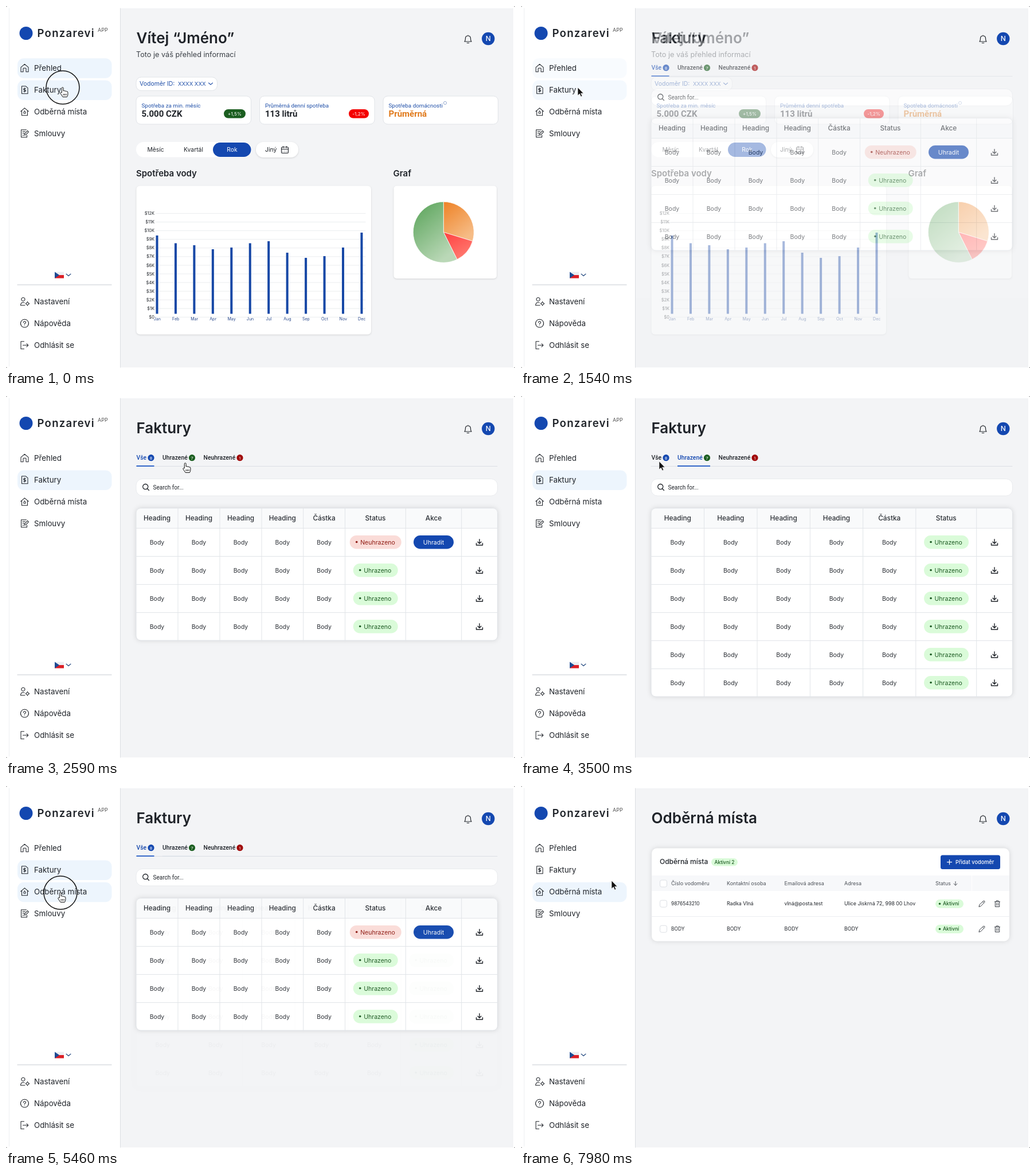
An HTML page for the animation above (8000 ms loop, 888 by 631 pixels).

```html
<!DOCTYPE html>
<html lang="cs">
<meta charset="utf-8">
<title>Přehled</title>
<style>
  html, body { margin: 0; width: 100%; height: 100%; overflow: hidden; background: #888 }
  svg { display: block; width: 888px; height: 631px }
  text { font-family: Inter, sans-serif; white-space: pre }
  .r { font-family: Roboto, sans-serif }
  .m { text-anchor: middle }
  .e { text-anchor: end }
  .s { font-weight: 500 }
  .b { font-weight: 600 }
  .card { filter: drop-shadow(0 1px 1.5px #0002) }
  .soft { filter: drop-shadow(0 0 4px #0002) }
</style>
<svg id="stage" viewBox="0 0 888 631"></svg>
<script>
const INK = '#1f2329', BLUE = '#1448b0', GREEN = '#1b5e20', RED = '#a00404', BG = '#f3f4f6', MINT = '#dafbd9', LINE = '#e1e4e8';

const text = (x, y, s, size, cls = '', fill = INK) =>
  `<text x="${x}" y="${y}" font-size="${size}" class="${cls}" fill="${fill}">${s}</text>`;
const rect = (x, y, w, h, rx, fill, more = '') =>
  `<rect x="${x}" y="${y}" width="${w}" height="${h}" rx="${rx}" fill="${fill}" ${more}/>`;
const circle = (x, y, r, fill, more = '') => `<circle cx="${x}" cy="${y}" r="${r}" fill="${fill}" ${more}/>`;
const line = (d, color = INK, width = 1.1, x = 0, y = 0) =>
  `<path d="${d}" transform="translate(${x} ${y})" fill="none" stroke="${color}" stroke-width="${width}" stroke-linecap="round" stroke-linejoin="round"/>`;
const group = (id, body) => `<g id="${id}">${body}</g>`;
const page = (id, body) => group(id, rect(200, 4, 685, 626, 0, BG) + body);
const title = s => text(227.5, 65, s, 26, 'b');
const each = (n, f) => Array.from({ length: n }, (_, i) => f(i)).join('');

function sidebar() {
  const menu = [['Přehled', 113], ['Faktury', 151], ['Odběrná místa', 189], ['Smlouvy', 227],
    ['Nastavení', 520], ['Nápověda', 558], ['Odhlásit se', 596]];
  const icons = [
    'M-6.5-1.5 0-7 6.5-1.5V6.5H2.5V1q0-1-1-1h-3q-1 0-1 1V6.5H-6.5z',
    'M-5-6.5H2L5.5-3.5V6.5H-5zM2-2.5H-.5q-1.5 0-1.5 1.3T-.5 0 .3 0Q2 0 2 1.3T.5 2.7H-2M0-3.5V3.7',
    'M-7-.5 0-6.5 7-.5M-5-2V6.5H5V-2M0-1.5Q-3.4 3 0 3T0-1.5',
    'M3-6.5H-6V6.5H4V3M-3.5-3.5H1M-3.5-.5H-.5M-3.5 3H-2M-.5 3 0 .5 5-5 7-3 2 2.3z',
    'M-2.5-7a3 3 0 1 1-.1 0M-7 6.5q0-5 4.5-5 1.5 0 2 .4M-7 6.5H.5M5 1.2a2.3 2.3 0 1 1-.1 0M5 0v1M5 6v1M1.6 3.5h1M7.4 3.5h1',
    'M0-7a7 7 0 1 1-.1 0M-2-1.5Q-2-3.6 0-3.6T2-1.8Q2-.6 0 .5V1.5M0 3.7v.1',
    'M-1-6.5H-6.5V6.5H-1M-3 0H6M3.5-2.8 6.3 0 3.5 2.8'];
  return rect(0, 0, 888, 631, 3, '#fff') + line('M5.5 4V628', '#eeeff1', 1) + line('M199.5 4V630', '#dcdfe3', 1) +
    each(3, i => `<g id="item${i}">${rect(20, 91.3 + i * 38.2, 164.5, 34.5, 11, '#edf5fd')}</g>`) +
    circle(35, 47.5, 11.5, BLUE) +
    `<g letter-spacing="1.3">${text(54.5, 53.5, 'Ponzarevi', 18.5, 'b')}</g>` + text(160, 44.5, 'APP', 9, '', '#555') +
    menu.map(([s, y], i) => text(49, y, s, 13.3) + line(icons[i], INK, 1.05, 32.5, y - 4.7)).join('') +
    rect(85, 463.5, 16, 5.5, 0, '#eceef2') + rect(85, 469, 16, 5.5, 0, '#dc1f26') +
    `<path d="M85 463.5 93 469 85 474.5z" fill="#1c4a93"/>` +
    line('M105 467 109 470.5 113 467', '#244a80') + line('M20 486H184', '#dadde1', 1.4);
}

function pieSlice(from, to, fill) {
  const at = a => [763.3 + 53 * Math.sin(a * Math.PI / 180), 394.3 - 53 * Math.cos(a * Math.PI / 180)];
  return `<path d="M763.3 394.3L${at(from)}A53 53 0 ${to - from > 180 ? 1 : 0} 1 ${at(to)}z" fill="url(#${fill})" stroke="#fff" stroke-width=".7"/>`;
}

function home() {
  const tops = [400, 413.5, 417, 424, 421, 413.5, 410, 430, 439, 436, 421, 395];
  const months = 'Jan Feb Mar Apr May Jun Jul Aug Sep Oct Nov Dec'.split(' ');
  const barX = i => 263.5 + i * 32.45;
  const stats = [['Spotřeba za min. měsíc', '5.000 CZK'], ['Průměrná denní spotřeba', '113 litrů'], ['Spotřeba domácnosti', 'Průměrná']];
  const gradient = (id, a, b) => `<linearGradient id="${id}" x2=".6" y2="1"><stop stop-color="${a}"/><stop offset="1" stop-color="${b}"/></linearGradient>`;
  return title('Vítej “Jméno”') + text(227, 89, 'Toto je váš přehled informací', 12.7, '', '#3b4047') +
    rect(227, 124, 141.5, 23.5, 9, '#fff', `stroke="${LINE}"`) +
    text(233, 139, 'Vodoměr ID:', 10.5, '', '#1f4fa8') + text(300, 139, 'XXXX XXX', 9.6, '', '#1f4fa8') +
    line('M353.5 134 357 137.2 360.5 134', '#1f4fa8') +
    stats.map(([label, value], i) => {
      const x = 227 + i * 215.5;
      return rect(x, 157, 200.5, 49, 8, '#fff', `stroke="${LINE}"`) + text(x + 9.5, 176.5, label, 9.9, 'r', '#1f4fa8') +
        text(x + 9.5, 193, value, 15, 'r b', i == 2 ? '#e07a1c' : INK);
    }).join('') +
    circle(766, 169, 2.6, 'none', 'stroke="#6a87bd" stroke-width=".7"') +
    rect(380, 180, 38, 15.5, 7.7, GREEN) + text(399, 190.8, '+1,5%', 8.2, 'm', '#fff') +
    rect(598, 180, 35, 15.5, 7.7, '#f40000') + text(615.5, 190.8, '-1,2%', 8.2, 'm', '#fff') +
    rect(227, 237, 201, 26.5, 13, '#fff') + rect(361, 238, 66.5, 25, 12.5, BLUE) +
    text(261, 254, 'Měsíc', 10.3, 'm') + text(327, 254, 'Kvartál', 10.3, 'm') + text(394.5, 254, 'Rok', 10.3, 'm', '#fff') +
    rect(436, 237, 74, 27, 13, '#fff', 'class="card"') + text(452, 254, 'Jiný', 10.5) +
    line('M482 246H491q1.5 0 1.5 1.5V255q0 1.5-1.5 1.5H482q-1.5 0-1.5-1.5v-7.5Q480.5 246 482 246zM480.5 249.5H492.5M483.5 244.5v2.5M489.5 244.5v2.5M483 252h.1M486.5 252h.1M490 252h.1M483 254.5h.1M486.5 254.5h.1M490 254.5h.1') +
    text(227, 296.5, 'Spotřeba vody', 15, 'b') + text(675.5, 296.5, 'Graf', 15, 'b') +
    rect(227.5, 313.5, 409.5, 259, 6, '#fff', 'class="card"') +
    each(13, i => {
      const y = 361.5 + i * 15.07;
      return line(`M262 ${y}H627`, '#e9ebee', .9) + text(259, y + 2.6, i < 12 ? `$${12 - i}K` : '$0', 7.4, 'e');
    }) +
    tops.map((y, i) => rect(barX(i) - 2, y, 4, 536.5 - y, 0, '#1748a6') +
      text(barX(i) + .3, 547.8, months[i], 7.1, 'm', '#2b4a8c')).join('') +
    rect(676.5, 313.5, 179.5, 161.5, 5, '#fff', 'class="card"') +
    gradient('orange', '#ee8226', '#f6bc86') + gradient('red', '#ff4040', '#ff7a70') + gradient('green', '#57a257', '#bad8b7') +
    pieSlice(0, 107, 'orange') + pieSlice(107, 153.5, 'red') + pieSlice(153.5, 360, 'green');
}

function invoices(active, rows, edges, paidOnly) {
  const tabs = [['Vše', 227.5, 253, 8, BLUE], ['Uhrazené', 273, 324.5, 7, GREEN], ['Neuhrazené', 344.5, 408, 1, RED]];
  const mid = i => (edges[i] + edges[i + 1]) / 2;
  const heads = ['Heading', 'Heading', 'Heading', 'Heading', 'Částka', 'Status', ...(paidOnly ? [] : ['Akce'])];
  const bottom = 230 + rows * 49;
  const status = (y, unpaid) => {
    const w = unpaid ? 90 : 78, x = mid(5) - w / 2 + .3, color = unpaid ? '#8f1a12' : '#1c5a22';
    return rect(x, y - 12, w, 23.5, 11.7, unpaid ? '#fadcd8' : MINT) + circle(x + 12, y - .5, 1.8, color) +
      text(x + 18.5, y + 3.5, unpaid ? 'Neuhrazeno' : 'Uhrazeno', 10.5, '', color);
  };
  return title('Faktury') + line('M227 122.5H857', '#dcdfe4', 1) +
    tabs.map(([s, x, cx, n, color], i) => text(x, 111.2, s, 10.4, 'r s', i == active ? BLUE : INK) +
      circle(cx, 107.7, 5.6, color) + text(cx, 110.7, n, 8, 'r m', '#fff') +
      (i == active ? rect(x, 121.2, cx + 5.5 - x, 1.8, 0, '#1d56c4') : '')).join('') +
    rect(227, 144.5, 630.5, 29.5, 11, '#fff', 'stroke="#e9ebee"') +
    line('M243.3 153.5a4.6 4.6 0 1 1-.1 0M246.8 161.8 249.5 164.5', INK, 1.3) + text(256.5, 162.5, 'Search for...', 10, 'r') +
    rect(227, 195.5, 630.5, bottom - 195.5, 8, '#fff', 'class="soft"') +
    `<path d="M227 230.5V203.5q0-8 8-8H849.5q8 0 8 8V230.5z" fill="#f9fafb"/>` +
    edges.slice(1, -1).map(x => line(`M${x} 195.5V${bottom}`, LINE, 1)).join('') +
    each(rows, i => line(`M227 ${230.5 + i * 49}H857.5`, LINE, 1)) +
    rect(227, 195.5, 630.5, bottom - 195.5, 8, 'none', `stroke="${LINE}"`) +
    heads.map((s, i) => text(mid(i), 217, s, 11.8, 'm s', '#2b2f35')).join('') +
    each(rows, i => {
      const y = 255 + i * 49;
      return each(5, c => text(mid(c), y + 3.5, 'Body', 10.5, 'm', '#2b2f35')) + status(y, !paidOnly && !i) +
        line('M0-5V2.5M-3-.5 0 2.5 3-.5M-5.5 2V5.3H5.5V2', INK, 1.4, 826, y - .3);
    }) +
    (paidOnly ? '' : rect(711, 243, 70, 23.5, 11.7, BLUE) + text(746, 258.5, 'Uhradit', 10.5, 'm', '#fff'));
}

function sites() {
  const cols = [262, 359, 459.5, 564];
  const rows = [['9876543210', 'Radka Vlná', 'vlná@posta.test', 'Ulice Jiskrná 72, 998 00 Lhov'], Array(4).fill('BODY')];
  const box = y => rect(242.5, y - 6, 12, 12, 3, '#fff', 'stroke="#dcdfe4"');
  return title('Odběrná místa') + rect(228, 108.5, 624, 162, 9, '#fff', 'class="soft"') +
    text(242, 136.3, 'Odběrná místa', 12, 's') +
    rect(332, 126, 46, 13.5, 6.7, MINT) + text(355, 135.8, 'Aktivní 2', 8.4, 'm s', '#1c5a22') +
    rect(732, 120.5, 104, 24.5, 3.5, BLUE) + line('M743.5 132.7H751.5M747.5 128.7V136.7', '#fff', 1.2) +
    text(758, 135.8, 'Přidat vodoměr', 9.2, 's', '#fff') +
    rect(228, 156, 624, 27, 0, '#f7f8fa') + line('M786.5 156V183', '#fff', 1.2) + box(170) +
    ['Číslo vodoměru', 'Kontaktní osoba', 'Emailová adresa', 'Adresa'].map((s, i) => text(cols[i], 173, s, 9, '', '#4c5158')).join('') +
    text(723, 173, 'Status', 9, '', '#4c5158') + line('M758 166.5V173M755 170.3 758 173.2 761 170.3', '#4c5158', 1) +
    line('M228 227.5H852', '#eceef1', 1) +
    rows.map((row, i) => {
      const y = 205.2 + i * 44;
      return box(y) + row.map((s, c) => text(cols[c], y + 3.2, s, c ? 8.8 : 8.4)).join('') +
        rect(723, y - 7.5, 49, 15, 7.5, MINT) + circle(730.5, y, 1.7, GREEN) + text(736, y + 3.1, 'Aktivní', 8.6, 's', '#1c5a22') +
        line('M-5 5-4 1.5 3-5Q5.5-5.2 5-3L-1.5 4zM1.5-3.5 3.7-1.3', '#3d4249', 1, 804, y) +
        line('M-4.5-3.5H4.5M-1.8-3.5V-5.3H1.8V-3.5M-3.7-3.5V5.3H3.7V-3.5M-1.3-1V3M1.3-1V3', '#3d4249', 1, 831, y);
    }).join('');
}

const stage = document.getElementById('stage');
stage.innerHTML = sidebar() +
  page('home', home()) +
  page('all', invoices(0, 4, [227, 300, 373, 446, 518.7, 591.5, 697.3, 794.7, 857.5])) +
  page('paid', invoices(1, 6, [227, 319.5, 412, 504.3, 596.6, 688.8, 794.7, 857.5], true)) +
  page('sites', sites()) +
  line('M-6 4Q-4.5 2.5-4.5-1.5-4.5-6 0-6T4.5-1.5Q4.5 2.5 6 4zM-1.7 6.5H1.7M0-7V-6', INK, 1.2, 806, 58) +
  circle(841.3, 57, 11.2, BLUE) + text(841.3, 61.4, 'N', 12, 'm s', '#fff') +
  circle(0, 0, 0, 'none', 'id="ring" stroke="#111" stroke-width="1.5"') +
  group('pointer',
    '<path id="arrow" d="M0 0V14l3.3-3 2.2 5 2.2-.9L5.5 10.2H9.9z" fill="#111" stroke="#fff" stroke-width=".6"/>' +
    '<path id="hand" d="M-1.7 9V1.2a1.4 1.4 0 0 1 2.8 0V6q2.3-1.2 2.8.4 2.3-.9 2.6.7 2.4-.6 2.4 1.4v3.5q0 2-1.5 4.5H0L-4.3 9.8q.6-2.2 2.6-.8zM1.1 11v3M3.5 11v3M6 11v3" fill="#fff" stroke="#111" stroke-width="1" stroke-linejoin="round"/>');

const $ = id => document.getElementById(id);
const fade = (id, v) => $(id).setAttribute('opacity', v);
const dissolve = (t, start) => Math.sin(Math.min(1, Math.max(0, (t - start + 5) / 340)) * Math.PI / 2);

// time, x, y of the pointer tip
const path = [[2030, 99, 142], [2590, 313, 117], [3290, 313, 117], [3500, 241, 114], [3710, 160, 102],
  [3850, 124, 122], [4200, 95, 186], [7630, 95, 186], [7980, 158, 165]];
function pointerAt(t) {
  const i = path.findIndex(k => k[0] > t);
  if (i < 1) return path[i ? path.length - 1 : 0].slice(1);
  const [a, b] = [path[i - 1], path[i]], u = (t - a[0]) / (b[0] - a[0]);
  return [1, 2].map(j => a[j] + (b[j] - a[j]) * u);
}

// start, end, radius of the click ring
const rings = [[0, 1470, 29], [2730, 2800, 22], [2800, 3010, 29], [4760, 4830, 14], [4830, 5180, 21], [5180, 7070, 29]];

function draw(t) {
  const toAll = dissolve(t, 1400), toSites = dissolve(t, 7000);
  fade('all', toAll);
  fade('paid', dissolve(t, 2940) - dissolve(t, 5180));
  fade('sites', toSites);
  fade('item0', 1 - toAll);
  fade('item1', t < 1470 ? 1 : toAll - toSites);
  fade('item2', t < 4060 ? 0 : t < 7070 ? 1 : toSites);
  const [x, y] = pointerAt(t), at = `translate(${x} ${y})`;
  $('pointer').setAttribute('transform', at);
  $('ring').setAttribute('transform', at);
  const ring = rings.find(([from, to]) => t >= from && t < to);
  $('ring').setAttribute('r', ring ? ring[2] : 0);
  fade('ring', ring ? 1 : 0);
  const hand = t < 1470 || t >= 2450 && t < 3010 || t >= 5180 && t < 7070;
  fade('hand', hand ? 1 : 0);
  fade('arrow', hand ? 0 : 1);
}

const STEP = 70, LOOP = 8000, begin = performance.now();
function tick() {
  const t = (performance.now() - begin) % LOOP;
  draw(Math.floor(t / STEP) * STEP);
  requestAnimationFrame(tick);
}
tick();
</script>
</html>
```
